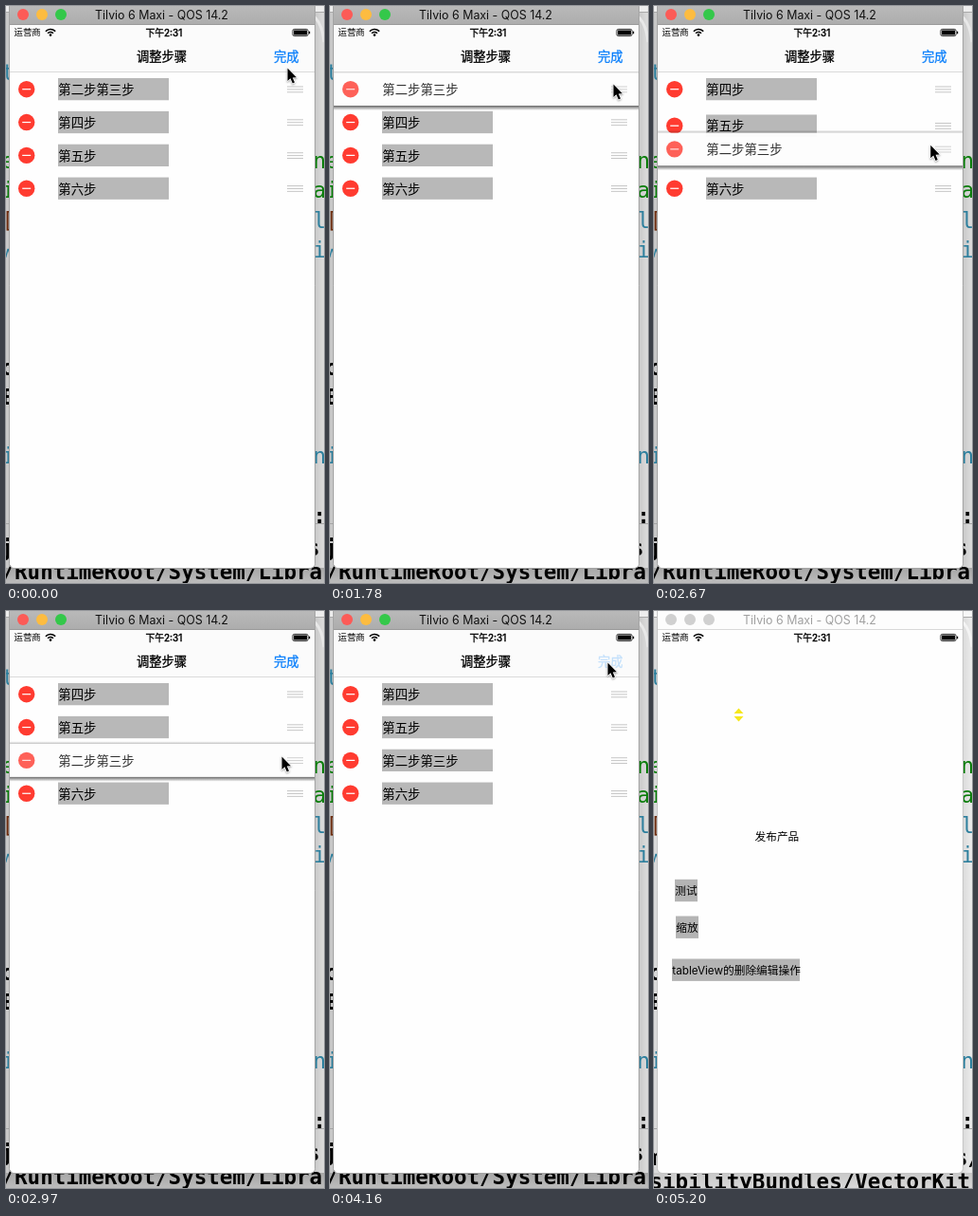
Animation of 336x608 px, one loop 5300 ms. Source, as an HTML page with a canvas:

```html
<!DOCTYPE html>
<html lang="zh">
<head>
<meta charset="utf-8">
<title>调整步骤</title>
<style>
html, body { margin: 0; width: 100%; height: 100%; overflow: hidden; background: #ddd; }
canvas { display: block; width: 336px; height: 608px; }
</style>
</head>
<body>
<canvas id="stage" width="336" height="608"></canvas>
<script>
const ctx = document.getElementById('stage').getContext('2d');
const LOOP = 5300, STEP = 148.5;
const LIFT = 1780, DROP = 3260, PRESS = 4150, DISMISS = 4200, BLUR = 5190;
const SANS = 'Inter, "Noto Sans CJK SC", "Noto Sans CJK", sans-serif';
const CJK = '"Noto Sans CJK SC", "Noto Sans CJK", sans-serif';
const MONO = '"DejaVu Sans Mono", monospace';
const ROW = 34.85, FIRST = 88;
const INK = { t: '#2d7f9d', g: '#0b7d0b', b: '#6b2a0c', k: '#000' };

const easeOut = power => u => 1 - (1 - u) ** power;
const smooth = u => u * u * (3 - 2 * u);

// Eased 0..1 progress between two moments
function progress(t, from, to, ease = smooth) {
  return ease(Math.min(1, Math.max(0, (t - from) / (to - from))));
}

const dragged = t => progress(t, 2000, 2970, easeOut(2));

function pointerAt(t) {
  const legs = [
    [progress(t, 100, 300), -2, -9],
    [progress(t, 500, 900), 4, 26],
    [dragged(t), -8, 71],
    [progress(t, 3400, 4000), 2, -99],
    [progress(t, DISMISS, 4765, easeOut(2)), 17, 558],
  ];
  return legs.reduce(([x, y], [p, dx, dy]) => [x + p * dx, y + p * dy], [297, 65]);
}

function rect(x, y, w, h, color) {
  ctx.fillStyle = color;
  ctx.fillRect(x, y, w, h);
}

function disc(x, y, r, color) {
  ctx.fillStyle = color;
  ctx.beginPath();
  ctx.arc(x, y, r, 0, Math.PI * 2);
  ctx.fill();
}

function trace(points) {
  ctx.beginPath();
  points.forEach(([x, y]) => ctx.lineTo(x, y));
  ctx.closePath();
}

// y is the vertical middle of the glyphs; heavy thickens the strokes
function text(str, x, y, size, { color = '#000', family = CJK, align = 'left', heavy = false } = {}) {
  ctx.font = `${heavy ? 500 : 400} ${size}px ${family}`;
  ctx.textAlign = align;
  ctx.fillStyle = ctx.strokeStyle = color;
  ctx.fillText(str, x, y + size * 0.37);
  if (heavy) {
    ctx.lineWidth = 0.3;
    ctx.strokeText(str, x, y + size * 0.37);
  }
}

function code(str, x, baseline, color = '#000', weight = 700) {
  ctx.font = `${weight} 22.5px ${MONO}`;
  ctx.textAlign = 'left';
  ctx.fillStyle = color;
  ctx.fillText(str, x, baseline);
}

function gradient(x0, y0, x1, y1, from, to) {
  const g = ctx.createLinearGradient(x0, y0, x1, y1);
  g.addColorStop(0, from);
  g.addColorStop(1, to);
  return g;
}

function drawDesktop(t, active) {
  const near = active ? '#c8c8c8' : '#dadada';
  const far = active ? '#dcdcdc' : '#ebebeb';
  rect(0, 0, 336, 608, gradient(326, 0, 336, 0, near, far));
  rect(0, 0, 336, 6, active ? '#ededed' : '#f6f6f6');
  rect(0, 6, 336, 1, '#a9a9a9');
  ctx.strokeStyle = active ? '#e8e8e8' : '#f4f4f4';
  ctx.lineWidth = 3;
  ctx.beginPath();
  ctx.moveTo(324, 10);
  ctx.quadraticCurveTo(334, 17, 336, 38);
  ctx.stroke();
  rect(0, 545, 336, 1, '#a5a5a5');
  rect(0, 592, 336, 16, active
    ? gradient(0, 592, 0, 608, '#a6a6a6', '#bcbcbc')
    : gradient(0, 592, 0, 608, '#c8c8c8', '#d8d8d8'));

  // One character per editor line, with its ink below
  const column = (chars, inks, x) => [...chars].forEach((ch, i) =>
    code(ch, x, 78 + i * 31.1, INK[inks[i]], inks[i] === 'k' ? 700 : 400));
  column('t  ei[w   oE i  ', 't  ggbt   kk t  ', -4.5);
  column('   nali      n :', '   ggtt      t k', 324.5);

  const scrolled = t > 4400;
  const base = scrolled ? 609 : 604;
  code(scrolled ? 'm' : 'j', -6, base - 25);
  code(scrolled ? 's/' : 's', 318, base - 25);
  code(scrolled ? 'sibilityBundles/VectorKit' : '/RuntimeRoot/System/Libra', -4.5, base);
}

function drawTitleBar(active) {
  rect(4, 0, 322, 19, active ? gradient(0, 0, 0, 19, '#b9b9b9', '#adadad') : '#fdfdfd');
  rect(4, 19, 322, 1, active ? '#9a9a9a' : '#d8d8d8');
  const lights = active ? ['#fc5b57', '#fdbc40', '#34c84a'] : Array(3).fill('#d0d0d0');
  lights.forEach((c, i) => disc(18 + i * 20, 9, 6, c));
  text('Tilvio 6 Maxi - QOS 14.2', 164.5, 9.5, 12.4,
    { color: active ? '#111' : '#a0a0a0', family: SANS, align: 'center' });
}

function drawStatusBar() {
  text('运营商', 8.5, 28, 9.4);
  text('下午2:31', 166.8, 28, 9.8, { family: SANS, heavy: true, align: 'center' });
  ctx.strokeStyle = '#000';
  ctx.lineWidth = 1.6;
  [4, 7].forEach(r => {
    ctx.beginPath();
    ctx.arc(47, 31.5, r, -Math.PI * 0.76, -Math.PI * 0.24);
    ctx.stroke();
  });
  disc(47, 30.6, 1.3, '#000');
  ctx.lineWidth = 0.8;
  ctx.beginPath();
  ctx.roundRect(302.9, 24.4, 16.2, 7.2, 1.8);
  ctx.stroke();
  rect(304, 25.5, 14, 5, '#000');
  rect(320, 26.7, 1.2, 2.6, '#000');
}

function drawNav() {
  rect(4, 20, 322, 49, '#fbfbfb');
  rect(4, 69, 322, 1, '#dadada');
}

function drawHome(t) {
  rect(4, 20, 322, 572, '#fefefe');
  ctx.globalAlpha = 1 - progress(t, 4460, 4740);
  drawNav();
  rect(106, 226, 49, 24, '#f6f8f9');
  ctx.globalAlpha = 1;
  ctx.fillStyle = '#f6e71c';
  [[108, 102.5], [111, 116.5]].forEach(([base, tip]) => {
    trace([[84.5, base], [89.5, tip], [94.5, base]]);
    ctx.fill();
  });
  text('发布产品', 106.5, 238, 11.7);
  const labels = [['测试', 22, 294.5, 24], ['缩放', 23, 333.2, 24],
    ['tableView的删除编辑操作', 19, 378.2, 135]];
  labels.forEach(([str, x, y, w]) => {
    rect(x, y - 11.7, w, 23.4, '#b4b4b4');
    text(str, x + 0.3, y, 11.7, { family: SANS });
  });
}

function drawRow(label, y, lifted = false) {
  if (lifted) {
    const top = y - 17.5, bottom = y + 17;
    rect(4, top - 3, 322, 3, gradient(0, top - 3, 0, top, 'rgba(0,0,0,0)', 'rgba(0,0,0,.25)'));
    rect(4, bottom, 322, 5, gradient(0, bottom, 0, bottom + 5, 'rgba(0,0,0,.6)', 'rgba(0,0,0,0)'));
    rect(4, top, 322, bottom - top, 'rgba(253,253,253,.96)');
    ctx.globalAlpha = 0.8;
  }
  disc(21.7, y - 0.3, 8.7, '#ff3b30');
  rect(17.2, y - 0.9, 9, 1.2, '#fff');
  if (!lifted) rect(55, y - 12, 117, 23.3, '#b8b8b8');
  text(label, 55.3, y, 13.4);
  [-1, 0, 1].forEach(i => rect(297, y - 0.6 + i * 2.9, 17, 1, '#c6c6c6'));
  ctx.globalAlpha = 1;
}

function drawSheet(t, offset) {
  ctx.save();
  ctx.translate(0, offset);
  rect(4, 20, 322, 572, '#fefefe');
  const swapped = start => progress(t, start, start + 300, easeOut(2));
  drawRow('第四步', FIRST + ROW * (1 - swapped(2150)));
  drawRow('第五步', FIRST + ROW * (2 - swapped(2470)));
  drawRow('第六步', FIRST + ROW * 3);
  drawRow('第二步第三步', FIRST + ROW * 2 * dragged(t), t >= LIFT && t < DROP);
  drawNav();
  text('调整步骤', 164.5, 53, 13.3, { heavy: true, align: 'center' });
  const pressed = t > PRESS && t < DISMISS;
  text('完成', 283, 53, 13.3, { heavy: true, color: pressed ? '#c4e0fb' : '#0a7ffb' });
  ctx.restore();
}

function drawPointer([x, y]) {
  ctx.save();
  ctx.translate(x, y);
  trace([[0.5, 0.5], [0.5, 14], [3.5, 11.2], [5.8, 16.6], [8, 15.6], [5.8, 10.4], [10, 10.2]]);
  ctx.strokeStyle = '#fff';
  ctx.lineWidth = 1.6;
  ctx.lineJoin = 'round';
  ctx.shadowColor = 'rgba(0,0,0,.35)';
  ctx.shadowBlur = 2;
  ctx.shadowOffsetY = 1;
  ctx.stroke();
  ctx.shadowColor = 'transparent';
  ctx.fillStyle = '#000';
  ctx.fill();
  ctx.restore();
}

function draw(t) {
  const active = t < BLUR;
  drawDesktop(t, active);

  ctx.strokeStyle = active ? '#a4a4a4' : '#c6c6c6';
  ctx.lineWidth = 1;
  ctx.beginPath();
  ctx.roundRect(3.5, -4, 323, 596.5, 5);
  ctx.stroke();
  ctx.save();
  ctx.beginPath();
  ctx.roundRect(4, -4, 322, 596, 5);
  ctx.clip();
  drawHome(t);
  drawSheet(t, 588 * progress(t, DISMISS, DISMISS + 460, easeOut(3)));
  drawStatusBar();
  drawTitleBar(active);
  ctx.restore();

  drawPointer(pointerAt(t));
}

// The picture refreshes in even steps, like a slow screen capture.
function frame() {
  const now = performance.now() % LOOP;
  draw(Math.floor((now + 7) / STEP) * STEP);
  requestAnimationFrame(frame);
}
frame();
</script>
</body>
</html>
```
